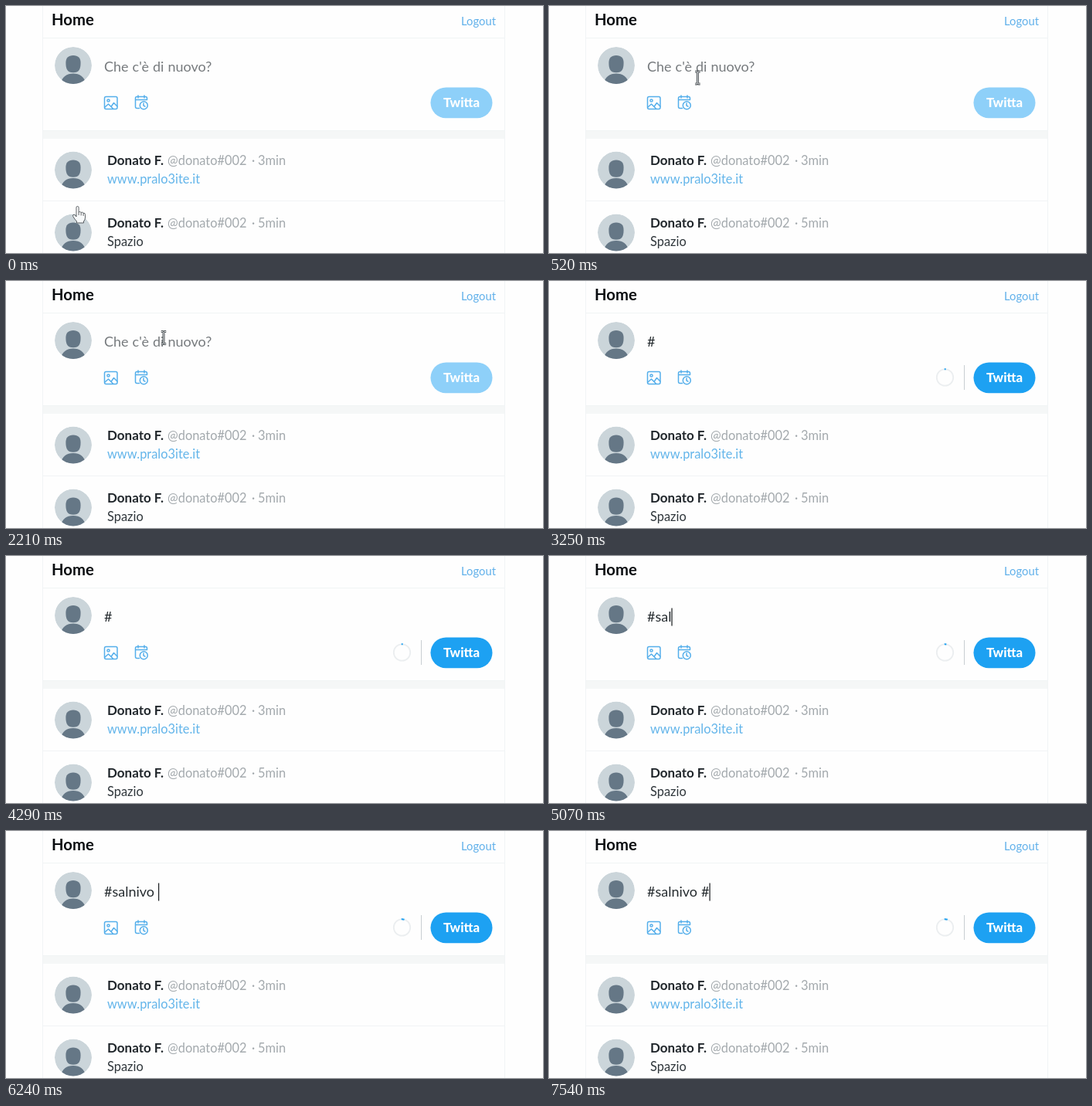
Write an HTML page that moves like this. It is 695 px wide and 320 px high and loops after 8 s.

```html
<!DOCTYPE html>
<html lang="it">
<head>
<meta charset="utf-8">
<title>Home</title>
<style>
  html, body { margin: 0; width: 100%; height: 100%; overflow: hidden; background: #fefefe; }
  svg { display: block; width: 100vw; height: 100vh; }
  text { font-family: Lato, "Open Sans", sans-serif; font-size: 16.4px; fill: #30373c; white-space: pre; }
  .title { font-size: 20.3px; font-weight: 700; fill: #0a0d10; }
  .logout { font-size: 14.8px; fill: #60b0ea; }
  .input { font-size: 18px; word-spacing: .4px; fill: #262c30; }
  .input.hint { fill: #777b7e; }
  .name { font-size: 17px; font-weight: 700; fill: #20262b; }
  .meta { fill: #a3a9ad; }
  .link { fill: #63b5ea; }
  .send { font-size: 16.8px; font-weight: 800; fill: #fff; text-anchor: middle; }
  .line { stroke: #f1f4f5; fill: none; }
  .icon { stroke: #55afeb; stroke-width: 1.5; fill: none; stroke-linejoin: round; stroke-linecap: round; }
</style>
</head>
<body>
<svg viewBox="0 0 695 320">
  <defs>
    <clipPath id="disc"><circle r="24"/></clipPath>
    <g id="avatar" clip-path="url(#disc)">
      <circle r="24" fill="#cbd5da"/>
      <path d="M0-13C6.5-13 9.6-9.5 9.6-3.5C9.6 5 7.5 9.3 0 9.3S-9.6 5-9.6-3.5C-9.6-9.5-6.5-13 0-13Z" fill="#657786"/>
      <path d="M-17 26C-15 15-9 10.5 0 10.5S15 15 17 26Z" fill="#657786"/>
    </g>
    <path id="bar" d="M-3.2-8H-1L0-7L1-8H3.2M0-7V7M-3.2 8H-1L0 7L1 8H3.2" fill="none"/>
  </defs>

  <rect width="695" height="320" fill="#fefefe"/>
  <rect x="47" y="161" width="599" height="11" fill="#f5f7f7"/>
  <path class="line" d="M47.5 0V320M645.5 0V320M47 41.5H646M47 161.5H646M47 252.5H646"/>

  <text class="title" x="59" y="25">Home</text>
  <text class="logout" x="589" y="25">Logout</text>

  <use href="#avatar" x="87" y="77"/>
  <text class="input hint" id="hint" x="127" y="85">Che c'è di nuovo?</text>
  <text class="input" id="typed" x="127" y="85"></text>
  <rect id="caret" y="67.5" width="1.2" height="23" fill="#15191c"/>

  <g class="icon">
    <rect x="127.5" y="117.5" width="16.5" height="16" rx="2"/>
    <circle cx="132.5" cy="122.5" r="1.6"/>
    <path d="M128 131L132.5 127L136 130.5L139.5 125.5L144 130M136 130.5L138.5 133"/>
    <path d="M172.5 132.5H169.5Q167.5 132.5 167.5 130.5V119.5Q167.5 117.5 169.5 117.5H180.5Q182.5 117.5 182.5 119.5V121.5M167.5 121.5H182.5M171 116V119M179 116V119"/>
    <circle cx="178.3" cy="128.7" r="5"/>
    <path d="M178 126V129L180 130.2"/>
  </g>

  <g id="counter" fill="none">
    <circle cx="512.5" cy="125" r="10.7" stroke="#ebeef0" stroke-width="1.8"/>
    <circle id="progress" cx="512.5" cy="125" r="10.7" stroke="#1da1f2" stroke-width="2" transform="rotate(-94 512.5 125)"/>
    <path d="M537.5 109V141" stroke="#c8ced2"/>
  </g>
  <rect id="button" x="549.5" y="105.5" width="80" height="39.7" rx="19.85"/>
  <text class="send" x="589.5" y="131">Twitta</text>

  <g id="feed"></g>

  <g id="pointer" stroke-linejoin="round">
    <path id="hand" d="M-1.5 11V1.2Q-1.5-.5 0-.5T1.6 1.2V7Q3.3 5.8 4.7 7.5Q6.4 6.5 7.6 8.3Q10 7.8 10 10.3V14Q10 17 8 19V21H-1V19Q-3.5 16.5-5.8 12.5Q-6.5 10.3-4.5 10.2Q-3 10.5-1.5 13ZM1.6 7V11M4.7 7.8V11.5M7.6 8.5V12" fill="#fff" fill-opacity=".85" stroke="#4a5054" stroke-width=".9"/>
    <path id="arrow" d="M0 0V16L3.7 12.6L6.2 18.2L8.6 17.1L6.2 11.8H11Z" fill="#fff" stroke="#4a5054"/>
    <g id="beam">
      <use href="#bar" stroke="#4a5054" stroke-width="3"/>
      <use href="#bar" stroke="#e4e6e7" stroke-width="1"/>
    </g>
  </g>
</svg>
<script>
const LOOP = 8000, STEP = 130;
const MESSAGE = "#salnivo #";
// [time, letters typed so far]
const KEYS = [[2470, 1], [4940, 3], [5070, 4], [5200, 5], [5330, 6], [5460, 7], [5720, 8], [5980, 9], [7410, 10]];
// times at which the caret turns on or off
const BLINKS = [650, 1170, 1690, 2210, 2470, 3120, 3640, 4160, 4550, 6500, 7150];

const $ = id => document.getElementById(id);
const show = (id, on) => $(id).setAttribute("visibility", on ? "visible" : "hidden");
const mix = (a, b, p) => a + (b - a) * p;

function post(y, age, body, cls) {
  return `<use href="#avatar" x="87" y="${y + 6.5}"/>
    <text class="name" x="131" y="${y}">Donato F.</text>
    <text class="meta" x="209" y="${y}">@donato#002</text>
    <text class="meta" x="318" y="${y}">·</text>
    <text class="meta" x="326" y="${y}">${age}</text>
    <text class="${cls}" x="131" y="${y + 24}">${body}</text>`;
}
$("feed").innerHTML = post(206, "3min", "www.pralo3ite.it", "link") + post(287, "5min", "Spazio", "");

function drawPointer(t, visible) {
  const k = Math.min(5, Math.floor(t / STEP)) / 5;
  const p = k * k * (3 - 2 * k);
  const x = mix(92.5, 204, p), y = mix(260, 73.5, p);
  const shape = y > 161 ? "hand" : y > 100 ? "arrow" : "beam";
  $("pointer").setAttribute("transform", `translate(${x} ${y})`);
  for (const id of ["hand", "arrow", "beam"]) show(id, visible && id === shape);
}

function draw(t) {
  const count = KEYS.reduce((n, [at, letters]) => t >= at ? letters : n, 0);
  const typing = count > 0;
  const typed = $("typed");
  typed.textContent = MESSAGE.slice(0, count);
  const width = typing ? typed.getComputedTextLength() : 0;

  $("caret").setAttribute("x", 127 + width);
  show("caret", BLINKS.filter(at => t >= at).length % 2 === 1);
  show("hint", !typing);
  show("counter", typing);
  $("progress").setAttribute("stroke-dasharray", `${1.7 + count * 0.23} 100`);
  $("button").setAttribute("fill", typing ? "#1da1f2" : "#8ed0f9");
  drawPointer(t, !typing);
}

const start = performance.now();
function tick() {
  draw((performance.now() - start) % LOOP);
  requestAnimationFrame(tick);
}
tick();
</script>
</body>
</html>
```
